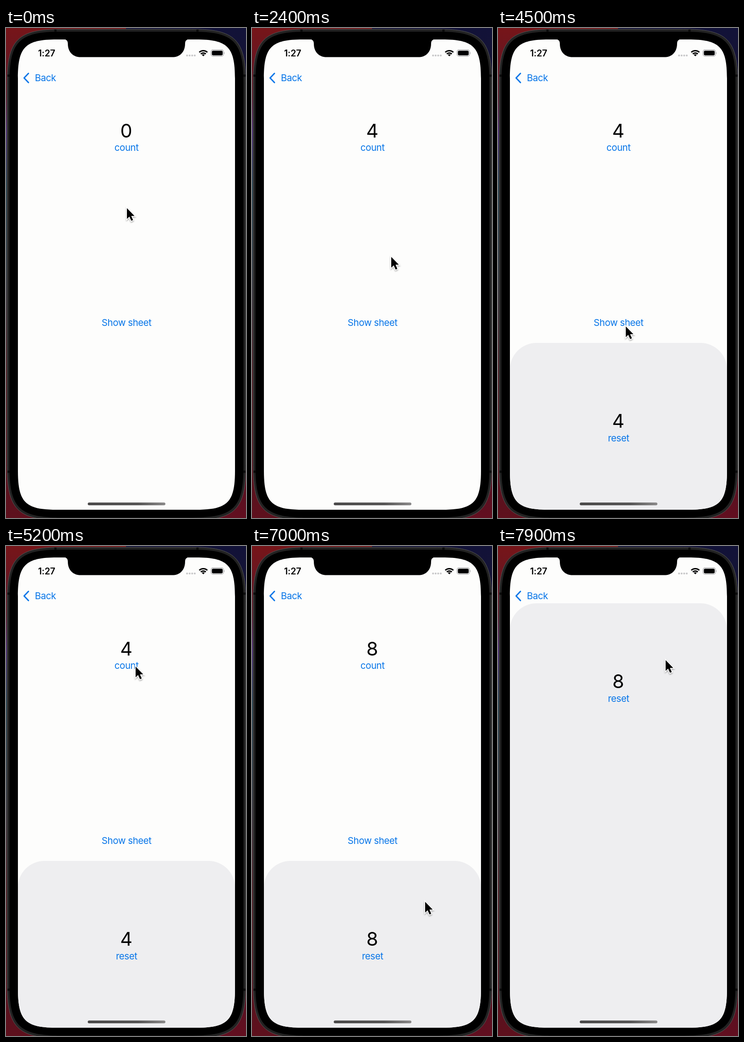
An HTML page that plays this animation: 524x1069 px, repeating every 8000 ms.

```html
<!DOCTYPE html>
<html lang="en">
<head>
<meta charset="utf-8">
<title>Counter sheet</title>
<style>
  html, body { margin: 0; width: 100%; height: 100%; overflow: hidden; background: #000; }
  svg { display: block; width: 524px; height: 1069px; }
  text { font-family: Inter, Roboto, sans-serif; text-anchor: middle; }
  .link { font-size: 20.5px; letter-spacing: -.45px; fill: #0876e8; }
  .number { font-size: 41.4px; fill: #000; }
  .clock { font-size: 19.5px; font-weight: 600; letter-spacing: -.1px; }

  #cursor, #sheet, #show { animation: 8s linear infinite; }
  #cursor { animation-name: point; }
  #sheet { animation-name: slide; }
  #show { animation-name: press; }

  @keyframes point {
    0% { transform: translate(264px, 393px); animation-timing-function: ease-in-out; }
    7.5% { transform: translate(276px, 264px); }
    24.4% { transform: translate(278px, 264px); animation-timing-function: ease-in; }
    30% { transform: translate(304px, 499px); animation-timing-function: ease-out; }
    38.75%, 57.5% { transform: translate(279px, 651px); animation-timing-function: ease-in-out; }
    64.4%, 81.9% { transform: translate(283px, 263px); animation-timing-function: ease-in-out; }
    87.5% { transform: translate(378px, 776px); animation-timing-function: ease-out; }
    91.25%, 93.75% { transform: translate(378px, 811px); animation-timing-function: ease-in-out; }
    98.75%, 100% { transform: translate(366px, 249px); }
  }
  @keyframes slide {
    0%, 50% { transform: translateY(364px); animation-timing-function: ease-in-out; }
    55.6%, 93.75% { transform: none; animation-timing-function: ease-in-out; }
    98.75%, 100% { transform: translateY(-562px); }
  }
  @keyframes press {
    0%, 48.7% { opacity: 1; }
    48.71%, 49.9% { opacity: .24; }
    53%, 100% { opacity: 1; }
  }
</style>
</head>
<body>
<svg viewBox="0 0 524 1069">
  <defs>
    <linearGradient id="leftWall" x2="0" y2="1">
      <stop offset="0" stop-color="#761519"/>
      <stop offset=".14" stop-color="#5c1729"/>
      <stop offset=".21" stop-color="#4c2a78"/>
      <stop offset=".32" stop-color="#264352"/>
      <stop offset=".5" stop-color="#333a44"/>
      <stop offset=".7" stop-color="#4e1c24"/>
      <stop offset="1" stop-color="#5e101d"/>
    </linearGradient>
    <linearGradient id="rightWall" x2="0" y2="1">
      <stop offset="0" stop-color="#121238"/>
      <stop offset=".5" stop-color="#201826"/>
      <stop offset="1" stop-color="#620f20"/>
    </linearGradient>
    <linearGradient id="homeBar">
      <stop offset="0" stop-color="#484747"/>
      <stop offset=".65" stop-color="#545353"/>
      <stop offset="1" stop-color="#8a8989"/>
    </linearGradient>
    <clipPath id="screen"><path data-box="26 25 474 1026 57"/></clipPath>
    <filter id="shadow" x="-50%" y="-50%" width="200%" height="200%">
      <feDropShadow dx="0" dy="2" stdDeviation="1.6" flood-opacity=".35"/>
    </filter>
  </defs>

  <rect width="262" height="1069" fill="url(#leftWall)"/>
  <rect x="262" width="262" height="1069" fill="url(#rightWall)"/>

  <!-- phone body -->
  <path data-box="2.5 2.5 521 1071 80" fill="#222" stroke="#565656"/>
  <path d="M3 104h5M3 968h5M518 104h5M518 968h5M108 3v5M418 3v5" stroke="#0c0c0c" stroke-width="5"/>
  <path data-box="7.5 8 511 1060 75"/>

  <g clip-path="url(#screen)">
    <rect x="25" y="25" width="476" height="1027" fill="#fdfdfc"/>
    <path d="M49 99l-9.5 10 9.5 10" fill="none" stroke="#0876e8" stroke-width="3" stroke-linecap="round" stroke-linejoin="round"/>
    <text class="link" x="86" y="116">Back</text>
    <text class="number" x="262.5" y="239" data-count>0</text>
    <text class="link" id="count" x="263.2" y="268">count</text>
    <text class="link" id="show" x="263.2" y="649.5">Show sheet</text>
    <g id="sheet">
      <rect x="26" y="687" width="474" height="1000" rx="58" fill="#eeeef0"/>
      <text class="number" x="262.5" y="872" data-count>0</text>
      <text class="link" x="263.2" y="901.5">reset</text>
    </g>
    <path d="M126 24C132 25 135 28 135 34C135 52 146 63.6 163 63.6H363C380 63.6 391 52 391 34C391 28 394 25 400 24Z"/>
    <rect x="178.5" y="1035.2" width="169.5" height="6.1" rx="3" fill="url(#homeBar)"/>
  </g>

  <!-- status bar -->
  <text class="clock" x="88.7" y="62">1:27</text>
  <path d="M395.3 60h17" stroke="#c6c6c8" stroke-width="4.2" stroke-linecap="round" stroke-dasharray="0 5.6"/>
  <g fill="none" stroke="#000" stroke-width="3">
    <path d="M422 53a12.6 12.6 0 0 1 17.6 0M425.3 56.6a8 8 0 0 1 11 0"/>
    <path d="M430.8 61.8l-3.2-3.3a4.6 4.6 0 0 1 6.4 0z" fill="#000" stroke="none"/>
  </g>
  <rect x="447.6" y="47.6" width="27.4" height="14" rx="4.2" fill="none" stroke="#a2a2a4" stroke-width="1.2"/>
  <rect x="449.5" y="49.5" width="23.6" height="10.2" rx="2.6"/>
  <path d="M476.2 52.4q2 2.2 0 4.6z" fill="#a2a2a4"/>

  <g id="cursor">
    <path d="M0 0V23.5L5.4 18.4L9.5 27.6L13.4 25.9L9.4 16.9H16.6Z" stroke="#fff" stroke-width="3.2" paint-order="stroke" filter="url(#shadow)"/>
  </g>
</svg>
<script>
  const RELEASES = [800, 1150, 1500, 1850, 5400, 5780, 6120, 6450];
  const HOLD = 100, FADE = 250, DIM = .2;
  const numbers = document.querySelectorAll('[data-count]');
  const button = document.getElementById('count');
  const clock = document.getElementById('cursor').getAnimations()[0];

  // Rounded box whose corners ease into the sides, as on the device.
  function smoothBox(x, y, w, h, r) {
    const d = r * 1.49, k = d * .81;
    const corner = (sx, sy, vertical) => vertical
      ? `c0 ${sy * k} ${sx * (d - k)} ${sy * d} ${sx * d} ${sy * d}`.replace(`${sx * (d - k)} ${sy * d}`, `${sx * (d - k)} ${sy * d}`)
      : `c${sx * k} 0 ${sx * d} ${sy * (d - k)} ${sx * d} ${sy * d}`;
    return `M${x} ${y + d}${corner(1, -1, true)}h${w - 2 * d}${corner(1, 1)}` +
      `v${h - 2 * d}${corner(-1, 1, true)}h${2 * d - w}${corner(-1, -1)}z`;
  }
  document.querySelectorAll('[data-box]').forEach(p =>
    p.setAttribute('d', smoothBox(...p.dataset.box.split(' ').map(Number))));

  function buttonOpacity(t) {
    if (RELEASES.some(r => t >= r - HOLD && t < r)) return DIM;
    const last = RELEASES.filter(r => r <= t).pop();
    return last === undefined ? 1 : Math.min(1, DIM + (1 - DIM) * (t - last) / FADE);
  }

  function draw() {
    const t = (clock.currentTime || 0) % 8000;
    const total = RELEASES.filter(r => r <= t).length;
    numbers.forEach(n => { n.textContent = total; });
    button.style.opacity = buttonOpacity(t);
    requestAnimationFrame(draw);
  }
  draw();
</script>
</body>
</html>
```
